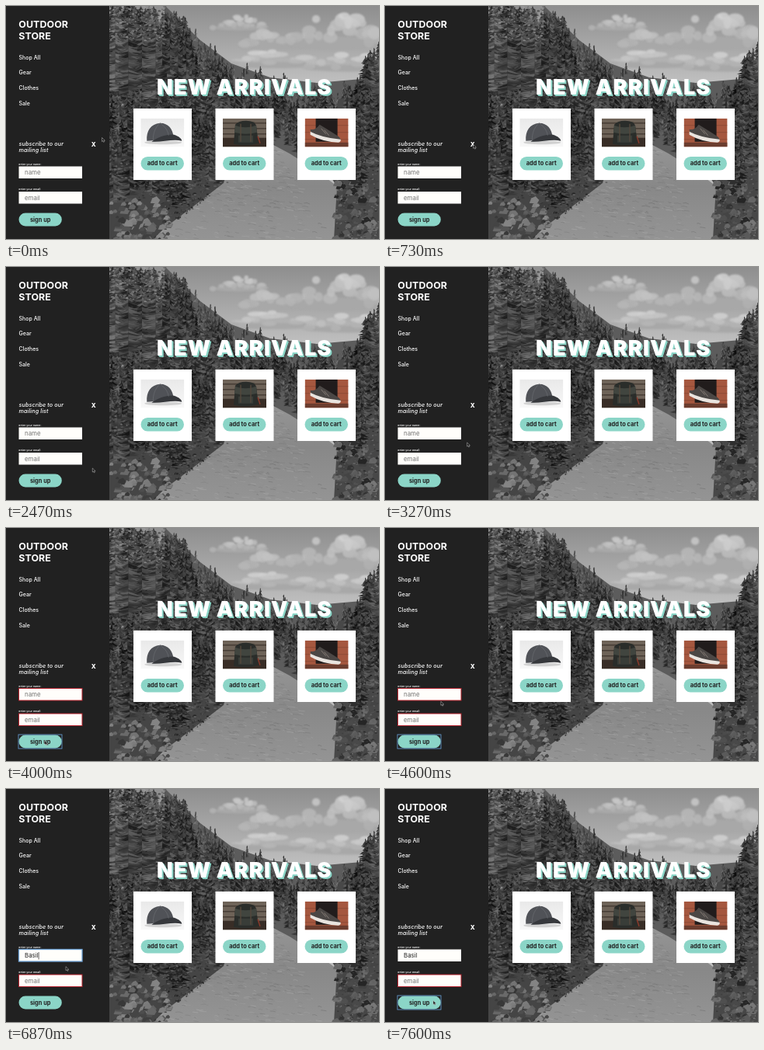
An HTML page with a canvas that plays this animation: 480x300 px, repeating every 8000 ms.

```html
<!DOCTYPE html>
<html lang="en">
<head>
<meta charset="utf-8">
<title>Outdoor store</title>
<style>
  html, body { margin: 0; width: 100%; height: 100%; overflow: hidden; background: #212121; }
  canvas, svg { position: absolute; left: 0; top: 0; width: 480px; height: 300px; }
  text { font: 500 7px Inter, "Open Sans", sans-serif; fill: #fff; white-space: pre; }
  .title { font-size: 12.4px; font-weight: 700; letter-spacing: .1px; }
  .hero { font-size: 27px; font-weight: 900; letter-spacing: 1.2px; text-anchor: middle; }
  .shade { fill: #8bd5c7; }
  .list { font-size: 7.2px; font-style: italic; letter-spacing: .1px; }
  .label { font-size: 3.6px; }
  .button { font-size: 7.4px; font-weight: 700; fill: #222; text-anchor: middle; }
  .toggle { font-size: 7.8px; font-weight: 800; text-anchor: middle; }
  .value { font-size: 7.9px; font-weight: 400; }
  .mint { fill: #8bd5c7; }
</style>
</head>
<body>
<canvas id="photo" width="480" height="300"></canvas>
<svg viewBox="0 0 480 300">
  <defs>
    <g id="card">
      <rect width="75" height="92" fill="#fff"/>
      <rect class="mint" x="9.5" y="62" width="55.5" height="17.5" rx="8.75"/>
      <text class="button" x="37.2" y="73.3">add to cart</text>
    </g>
    <clipPath id="crop"><rect width="56" height="36.5"/></clipPath>
    <linearGradient id="studio" x2="0" y2="1">
      <stop stop-color="#e9e9e9"/><stop offset="1" stop-color="#f8f8f8"/>
    </linearGradient>
  </defs>

  <rect width="133" height="300" fill="#212121"/>
  <text class="title" x="16.3" y="28.3">OUTDOOR</text>
  <text class="title" x="16.3" y="42.7">STORE</text>
  <text x="16.5" y="68.8">Shop All</text>
  <text x="16.5" y="88.3">Gear</text>
  <text x="16.5" y="108">Clothes</text>
  <text x="16.5" y="127.7">Sale</text>

  <text class="hero shade" x="308.8" y="116">NEW ARRIVALS</text>
  <text class="hero shade" x="307.8" y="115">NEW ARRIVALS</text>
  <text class="hero" x="306.8" y="114">NEW ARRIVALS</text>

  <use href="#card" x="164" y="132"/>
  <use href="#card" x="269.5" y="132"/>
  <use href="#card" x="375" y="132"/>

  <!-- cap -->
  <g transform="translate(173.3 144.7)" clip-path="url(#crop)">
    <rect width="56" height="37" fill="url(#studio)"/>
    <ellipse cx="29" cy="31" rx="24" ry="2.5" fill="#d2d2d2"/>
    <path d="M8 29C7 16 13 7 25 6C36 6 41 14 42 22C33 24 20 29 8 29Z" fill="#505257"/>
    <path d="M14 30C22 24 34 20 43 21C49 23 53 26 53 29C42 26 27 31 14 30Z" fill="#36383c"/>
    <path d="M25 6C18 12 16 20 16 28M25 6C32 11 35 16 36 22" fill="none" stroke="#6b6d72" stroke-width=".7"/>
  </g>

  <!-- backpack -->
  <g transform="translate(279 144.7)" clip-path="url(#crop)">
    <rect width="56" height="37" fill="#6e6358"/>
    <path d="M0 6H56M0 13H56M0 20H56" stroke="#463d35" stroke-width="1.4"/>
    <rect y="25" width="56" height="12" fill="#382d26"/>
    <path d="M14 33L16 8Q20 3 30 3Q41 3 43 9L46 32Q30 37 14 33Z" fill="#2a2d2a"/>
    <path d="M16 9Q29 14 43 9L44 18Q30 22 15 18Z" fill="#41453f"/>
    <path d="M20 22H39V31H20Z" fill="#393d38"/>
    <path d="M23 7V30M36 7V30" stroke="#54483c" stroke-width="1.4"/>
    <path d="M45 23L48 32" stroke="#8a3a2c" stroke-width="1.4"/>
  </g>

  <!-- shoe -->
  <g transform="translate(384.6 144.7)" clip-path="url(#crop)">
    <rect width="56" height="37" fill="#a5573f"/>
    <path d="M0 9H56M0 18H56M0 27H56" stroke="#844633" stroke-width=".7"/>
    <path d="M14 0H42V30H14Z" fill="#211c1c"/>
    <path d="M0 31H56V37H0Z" fill="#6b3d2f"/>
    <path d="M7 14Q13 16 19 8Q29 14 43 23Q47 26 45 29Q25 29 8 20Z" fill="#4b4745"/>
    <path d="M7 17Q22 25 46 27Q47 30 43 31Q22 30 7 21Z" fill="#e9e4df"/>
    <path d="M21 13L27 20M25 15L31 22" stroke="#857c76" stroke-width="1"/>
  </g>

  <g id="head">
    <text class="list" x="16.5" y="180">subscribe to our</text>
    <text class="list" x="16.5" y="188.1">mailing list</text>
    <text id="cross" class="toggle" x="112.7" y="181.2">X</text>
    <path id="plus" d="M110.3 260.6H114.5M112.4 258.5V262.7" transform="translate(0 -82)" stroke="#fff" stroke-width="1.3"/>
  </g>

  <g id="form">
    <text class="label" x="16.3" y="204.6">enter your name:</text>
    <rect id="nameBox" x="16.5" y="206.5" width="81.5" height="15.5" fill="#fffefb"/>
    <text id="nameText" class="value" x="24" y="216.9"></text>
    <path id="caret" d="M0 210V219.5" stroke="#222" stroke-width=".7"/>
    <text class="label" x="16.3" y="237.4">enter your email:</text>
    <rect id="mailBox" x="16.5" y="239" width="81.5" height="15.5" fill="#fffefb"/>
    <text class="value" style="fill:#757575" x="24" y="249.6">email</text>
    <rect class="mint" x="16.5" y="266.5" width="55.3" height="17" rx="8.5"/>
    <text class="button" x="44.2" y="277.6">sign up</text>
    <rect id="ring" x="16" y="266" width="56" height="18" fill="none" stroke="#6ba5df" stroke-width=".8"/>
  </g>

  <g id="pointer">
    <path id="arrow" d="M0 0V5L1.2 4L2 5.8L3 5.3L2.2 3.7H3.8Z" fill="#111" stroke="#ccc" stroke-width=".5"/>
    <path id="beam" d="M-1.3 -3.5H1.3M0 -3.5V3.5M-1.3 3.5H1.3" stroke="#333" stroke-width=".6"/>
  </g>
</svg>

<script>
const $ = id => document.getElementById(id);
const ctx = $('photo').getContext('2d');
let seed = 7;
const rand = (a = 0, b = 1) => {
  seed = (seed * 16807) % 2147483647;
  return a + (b - a) * seed / 2147483647;
};
const gray = (v, a = 1) => `rgba(${v | 0},${v | 0},${v | 0},${a})`;

function poly(fill, ...p) {
  ctx.fillStyle = fill;
  ctx.beginPath();
  for (let i = 0; i < p.length; i += 2) ctx.lineTo(p[i], p[i + 1]);
  ctx.fill();
}

function blob(x, y, rx, ry, fill) {
  ctx.fillStyle = fill;
  ctx.beginPath();
  ctx.ellipse(x, y, rx, ry, 0, 0, 7);
  ctx.fill();
}

// puffs rising from a flat, darker base
function cloud(x, base, w, h) {
  blob(x, base, w, h * .22, gray(168));
  for (let i = 0; i < 26; i++) {
    const u = rand(-1, 1), lift = rand() * (1 - u * u);
    blob(x + u * w, base - lift * h, rand(.08, .2) * w, rand(.12, .24) * h, gray(176 + 34 * lift + rand(-6, 6), .85));
  }
}

function pine(x, top, h, shade) {
  const rows = Math.max(6, h / 2.6);
  poly(gray(shade * .6), x - .5, top, x + .5, top, x + 1, top + h, x - 1, top + h);
  for (let i = 0; i < rows; i++) {
    const y = top + h * i / rows, w = 1 + h * .15 * Math.sqrt(i / rows);
    for (const side of [-1, 1]) {
      const v = Math.max(14, shade + rand(-34, 34));
      poly(gray(v), x, y - 1, x + side * w * rand(.4, 1.2), y + rand(1, 5), x, y + 3);
    }
  }
}

function forest(count, x0, x1, top, height, light) {
  for (let i = 0; i < count; i++) {
    const x = rand(x0, x1), h = height * rand(.6, 1.2);
    pine(x, top(x) + rand(-10, 10), h, rand(light - 16, light + 16));
  }
}

function dabs(count, x0, x1, top, bottom, dark, light) {
  for (let i = 0; i < count; i++) {
    const x = rand(x0, x1), y = rand(top(x), bottom(x));
    blob(x, y, rand(.5, 2.2), rand(.4, 1.2), gray(rand(dark, light), .8));
  }
}

function rocks(count, x0, x1, top, light) {
  for (let i = 0; i < count; i++) {
    const x = rand(x0, x1), r = rand(2, 7), y = rand(top(x), 304), v = rand(light - 40, light + 45);
    poly(gray(v), x - r, y + r * .6, x - r * .6, y - r * .4, x + r * .3, y - r * .8, x + r, y, x + r * .6, y + r * .7);
  }
}

function paintPhoto() {
  const sky = ctx.createLinearGradient(0, 0, 0, 95);
  sky.addColorStop(0, '#8e8e8e');
  sky.addColorStop(1, '#bebebe');
  ctx.fillStyle = sky;
  ctx.fillRect(133, 0, 347, 300);

  ctx.filter = 'blur(.8px)';
  cloud(300, 28, 34, 16);
  cloud(345, 76, 60, 18);
  cloud(440, 80, 55, 20);
  cloud(355, 50, 50, 24);
  cloud(425, 48, 62, 38);
  ctx.filter = 'none';

  // hills and the far valley
  const ridge = x => x < 300 ? 8 + (x - 215) * .8 : Math.min(96, 76 + (x - 300) * .3);
  poly('#5c5c5c', 205, 0, 250, 44, 290, 74, 340, 92, 400, 99, 480, 92, 480, 200, 205, 200);
  forest(150, 215, 470, x => ridge(x) + rand(0, 30), 22, 82);
  forest(130, 225, 450, x => Math.max(100, ridge(x)) + rand(0, 38), 38, 66);

  // river
  const water = ctx.createLinearGradient(0, 165, 0, 300);
  water.addColorStop(0, '#989898');
  water.addColorStop(.5, '#888');
  water.addColorStop(1, '#949494');
  poly(water, 290, 178, 335, 174, 365, 190, 400, 212, 426, 232, 424, 300, 190, 300, 222, 270, 258, 235, 282, 200);
  ctx.lineWidth = .7;
  for (let i = 0; i < 520; i++) {
    const y = rand(185, 300), k = (y - 170) / 130;
    const x = rand(292 - 86 * k, 340 + 74 * k), w = rand(2, 11);
    ctx.strokeStyle = gray(rand(85, 195), .45);
    ctx.beginPath();
    ctx.moveTo(x, y);
    ctx.quadraticCurveTo(x + w / 2, y + rand(-2, 2), x + w, y + 1);
    ctx.stroke();
  }

  // near trees and the left bank
  forest(70, 133, 235, x => (x - 133) * .3 - 8, 115, 70);
  forest(45, 200, 300, x => 15 + (x - 200) * .85, 60, 62);
  dabs(240, 133, 205, () => 0, () => 45, 60, 165);
  poly('#454545', 133, 130, 240, 130, 292, 190, 280, 228, 245, 255, 205, 285, 190, 300, 133, 300);
  forest(95, 133, 245, () => rand(95, 175), 70, 60);
  forest(45, 232, 290, x => 115 + (x - 232) * .6 + rand(0, 45), 42, 55);
  dabs(500, 133, 285, () => 110, x => 250 - Math.max(0, x - 215) * .3, 25, 115);
  rocks(120, 133, 210, () => 248, 92);
  dabs(260, 205, 262, () => 222, x => 288 - (x - 205) * .75, 25, 110);

  // right bank
  poly('#484848', 428, 120, 480, 110, 480, 300, 422, 300, 426, 232, 412, 212);
  forest(9, 462, 484, x => 65 - (x - 462), 115, 66);
  forest(40, 436, 482, () => rand(100, 190), 55, 60);
  rocks(95, 424, 482, () => 226, 76);
  dabs(260, 424, 482, () => 160, () => 300, 25, 135);
}

const typed = [[5470, 'B'], [5670, 'Ba'], [5930, 'Bas'], [6070, 'Basi'], [6330, 'Basil']];

// start, end, then the points passed on the way
const moves = [
  [0, 800, [123.5, 169.5], [113.4, 178.5]],
  [1530, 2130, [113.4, 178.5], [111.3, 259]],
  [2870, 3730, [111.3, 259], [118, 240], [102.5, 222.5], [75, 248], [50, 274]],
  [4000, 4800, [50, 274], [52, 266], [60, 250], [68, 235], [71, 226], [75, 214]],
  [6670, 7330, [75, 214], [78, 236], [72, 258], [62, 272.5]]
];

function pointerAt(t) {
  const [start, end, ...pts] = moves.filter(m => m[0] <= t).pop();
  const u = Math.min(1, (t - start) / (end - start));
  const s = u * u * (3 - 2 * u) * (pts.length - 1);
  const i = Math.min(pts.length - 2, Math.floor(s));
  return [0, 1].map(k => pts[i][k] + (pts[i + 1][k] - pts[i][k]) * (s - i));
}

const show = (id, on) => { $(id).style.display = on ? '' : 'none'; };

function border(id, color, width = 1) {
  $(id).setAttribute('stroke', color);
  $(id).setAttribute('stroke-width', width);
}

function render(t) {
  const closed = t >= 1070 && t < 2400;
  const checked = t >= 4000, focused = t >= 4870 && t < 7600;
  $('head').setAttribute('transform', `translate(0 ${closed ? 82 : 0})`);
  show('cross', !closed);
  show('plus', closed);
  show('form', !closed);

  const entry = typed.filter(k => k[0] <= t).pop();
  const label = $('nameText');
  label.textContent = entry ? entry[1] : 'name';
  label.style.fill = entry ? '#222' : '#757575';
  show('caret', focused);
  if (focused) {
    const x = entry ? 24.5 + label.getComputedTextLength() : 24;
    $('caret').setAttribute('transform', `translate(${x} 0)`);
  }

  const red = '#b5222d';
  if (focused) border('nameBox', '#70a5d8', 1.3);
  else border('nameBox', checked && !entry ? red : 'none');
  border('mailBox', checked ? red : 'none');
  show('ring', checked && !focused);

  const [x, y] = pointerAt(t);
  const inField = x > 16 && x < 98 && (y > 206 && y < 222 || y > 239 && y < 255);
  $('pointer').setAttribute('transform', `translate(${x} ${y})`);
  show('pointer', t < 5470 || t >= 6670);
  show('arrow', !inField);
  show('beam', inField);
}

function loop() {
  render(performance.now() % 8000);
  requestAnimationFrame(loop);
}

paintPhoto();
loop();
</script>
</body>
</html>
```
